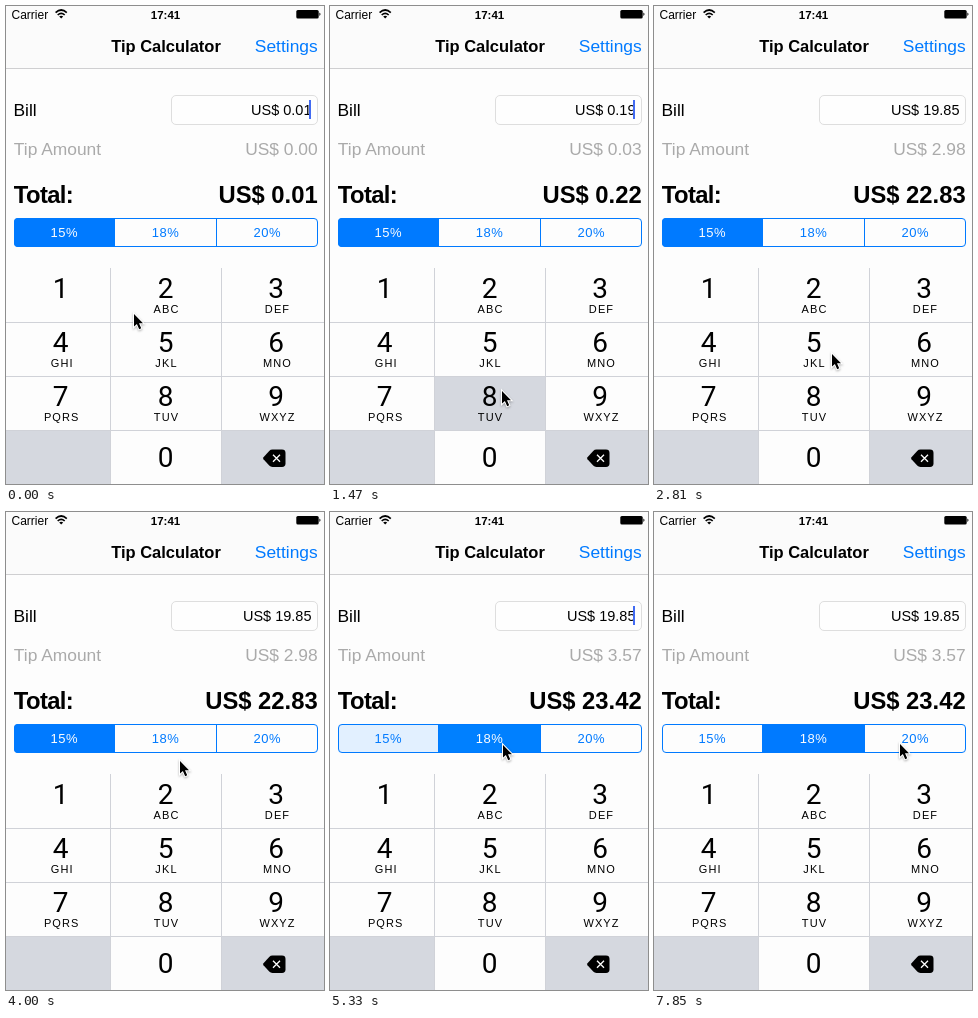
An HTML page that plays this animation: 318x478 px, repeating every 8000 ms.

```html
<!DOCTYPE html>
<html lang="en">
<head>
<meta charset="utf-8">
<title>Tip Calculator</title>
<style>
  html, body { margin: 0; width: 100%; height: 100%; overflow: hidden; background: #fdfdfd; }
  svg { display: block; width: 318px; height: 478px; font: 17.4px "Liberation Sans", Arial, sans-serif; }

  .bold { font-weight: bold; }
  .end, .sum { text-anchor: end; }
  .mid { text-anchor: middle; }
  .blue { fill: #007aff; }
  .gray { fill: #aaa; }
  .bill { font-size: 14.5px; }
  .total { font-size: 23.8px; font-weight: bold; }
  .rate { font-size: 13px; letter-spacing: .5px; }
  .digits { font-family: Roboto, "Liberation Sans", sans-serif; font-size: 28px; }
  .letters { font-size: 11px; letter-spacing: 1.1px; }
  .pad { fill: #d5d8df; }

  /* Every part holds its value until the next keyframe. */
  .sum, .press, .seg, .rate text, #caret, #cursor { animation: 8s step-end infinite; }
  .sum, .press { visibility: hidden; }

  #sum1 { animation-name: sum1; }
  #sum2 { animation-name: sum2; }
  #sum3 { animation-name: sum3; }
  #sum4 { animation-name: sum4; }
  #sum5 { animation-name: sum5; }
  @keyframes sum1 { 0% { visibility: visible } 7.375%, 100% { visibility: hidden } }
  @keyframes sum2 { 7.375% { visibility: visible } 18.5%, 100% { visibility: hidden } }
  @keyframes sum3 { 18.5% { visibility: visible } 27.75%, 100% { visibility: hidden } }
  @keyframes sum4 { 27.75% { visibility: visible } 66.625%, 100% { visibility: hidden } }
  @keyframes sum5 { 66.625%, 100% { visibility: visible } }

  #press8 { animation-name: press8; }
  #press5 { animation-name: press5; }
  @keyframes press8 { 16.625% { visibility: visible } 18.5%, 100% { visibility: hidden } }
  @keyframes press5 { 25.875% { visibility: visible } 27.75%, 100% { visibility: hidden } }

  #seg15 { animation-name: seg15; }
  #seg18 { animation-name: seg18; }
  #rate15 { animation-name: rate15; }
  #rate18 { animation-name: rate18; }
  @keyframes seg15 { 0% { fill: #007aff } 66.625% { fill: #e2f0ff } 68.5%, 100% { fill: #fdfdfd } }
  @keyframes seg18 {
    0% { fill: #fdfdfd } 64.875% { fill: #d9eaff }
    66.625% { fill: #0080ff } 68.5%, 100% { fill: #007aff }
  }
  @keyframes rate15 { 0% { fill: #fdfdfd } 66.625%, 100% { fill: #007aff } }
  @keyframes rate18 { 0% { fill: #007aff } 66.625%, 100% { fill: #fdfdfd } }

  #caret { animation-name: blink; }
  @keyframes blink {
    0%, 40.75%, 53.625%, 66.625%, 77.75%, 90.75% { opacity: 1 }
    33.375%, 38.875%, 44.5%, 51.75%, 59.25%, 64.875%, 70.375%, 83.25%, 88.875%, 96.25% { opacity: .5 }
    35.125%, 46.25%, 61.125%, 72.25%, 85.125%, 98.125%, 100% { opacity: 0 }
  }

  #cursor { animation-name: point; filter: drop-shadow(0 1px 1px rgba(0, 0, 0, .3)); }
  @keyframes point {
    0% { transform: translate(128px, 308px) }
    1.75% { transform: translate(146px, 325px) }
    3.625% { transform: translate(200px, 366px) }
    5.5% { transform: translate(240px, 391px) }
    7.375% { transform: translate(242px, 392px) }
    9.25% { transform: translate(222px, 386px) }
    11.125% { transform: translate(187px, 379px) }
    13% { transform: translate(174px, 383px) }
    14.75% { transform: translate(172px, 385px) }
    20.375% { transform: translate(173px, 378px) }
    22.125% { transform: translate(175px, 358px) }
    24% { transform: translate(178px, 348px) }
    46.25% { transform: translate(177px, 332px) }
    48.125% { transform: translate(175px, 288px) }
    50% { transform: translate(174px, 249px) }
    51.75% { transform: translate(173px, 235px) }
    53.625% { transform: translate(173px, 233px) }
    85.125% { transform: translate(182px, 233px) }
    87% { transform: translate(204px, 233px) }
    88.875% { transform: translate(228px, 232px) }
    90.75% { transform: translate(241px, 232px) }
    92.625%, 100% { transform: translate(246px, 232px) }
  }
</style>
</head>
<body>
<svg viewBox="0 0 318 478">
  <defs>
    <clipPath id="bar"><rect x="8" y="212" width="304" height="29" rx="4"/></clipPath>
  </defs>
  <rect width="318" height="478" fill="#fdfdfd"/>

  <!-- Status and title bar -->
  <rect width="318" height="62" fill="#fbfbfb"/>
  <rect y="62" width="318" height="1" fill="#cfcfd1"/>
  <text x="5.5" y="12.5" font-size="12">Carrier</text>
  <g fill="none" stroke="#000" stroke-width="1.7">
    <path d="M49.6 6.6Q55.2 1.4 60.8 6.6M51.7 9Q55.2 5.7 58.7 9"/>
    <path d="M55.2 12.6L53.2 10.5Q55.2 8.9 57.2 10.5Z" fill="#000" stroke="none"/>
  </g>
  <text class="bold mid" x="159.5" y="12.5" font-size="11.5">17:41</text>
  <rect x="290.3" y="4" width="22.4" height="8.5" rx="1.5"/>
  <path d="M313.4 6.5Q315.6 8.2 313.4 10Z"/>
  <text class="bold mid" x="160" y="46" font-size="16.5">Tip Calculator</text>
  <text class="blue end" x="311.7" y="46">Settings</text>

  <!-- Amounts -->
  <rect x="165.5" y="89.5" width="146" height="29" rx="4.5" fill="#fefefe" stroke="#dedede"/>
  <text x="7.5" y="110">Bill</text>
  <text class="gray" x="7.8" y="149">Tip Amount</text>
  <text class="total" x="7.8" y="197" letter-spacing="-.6">Total:</text>
  <g id="sum1" class="sum">
    <text class="bill" x="305.5" y="109">US$ 0.01</text>
    <text class="gray" x="311.7" y="149">US$ 0.00</text>
    <text class="total" x="311.7" y="197">US$ 0.01</text>
  </g>
  <g id="sum2" class="sum">
    <text class="bill" x="305.5" y="109">US$ 0.19</text>
    <text class="gray" x="311.7" y="149">US$ 0.03</text>
    <text class="total" x="311.7" y="197">US$ 0.22</text>
  </g>
  <g id="sum3" class="sum">
    <text class="bill" x="305.5" y="109">US$ 1.98</text>
    <text class="gray" x="311.7" y="149">US$ 0.30</text>
    <text class="total" x="311.7" y="197">US$ 2.28</text>
  </g>
  <g id="sum4" class="sum">
    <text class="bill" x="305.5" y="109">US$ 19.85</text>
    <text class="gray" x="311.7" y="149">US$ 2.98</text>
    <text class="total" x="311.7" y="197">US$ 22.83</text>
  </g>
  <g id="sum5" class="sum">
    <text class="bill" x="305.5" y="109">US$ 19.85</text>
    <text class="gray" x="311.7" y="149">US$ 3.57</text>
    <text class="total" x="311.7" y="197">US$ 23.42</text>
  </g>
  <rect id="caret" x="303" y="94" width="2" height="19" fill="#426bf2"/>

  <!-- Tip rates -->
  <g clip-path="url(#bar)">
    <rect id="seg15" class="seg" x="8" y="212" width="100" height="29"/>
    <rect id="seg18" class="seg" x="109" y="212" width="101" height="29"/>
  </g>
  <rect x="8.5" y="212.5" width="303" height="28" rx="3.5" fill="none" stroke="#007aff"/>
  <path d="M108.5 212V241M210.5 212V241" stroke="#007aff"/>
  <g class="rate mid">
    <text id="rate15" x="58.2" y="231">15%</text>
    <text id="rate18" x="159.5" y="231">18%</text>
    <text class="blue" x="261.3" y="231">20%</text>
  </g>

  <!-- Keypad -->
  <path class="pad" d="M0 425H104V478H0ZM216 425H318V478H216Z"/>
  <rect id="press8" class="pad press" x="105" y="371" width="110" height="53"/>
  <rect id="press5" class="pad press" x="105" y="317" width="110" height="53"/>
  <path d="M104.5 262V478M215.5 262V478M0 316.5H318M0 370.5H318M0 424.5H318" stroke="#d0d2d8"/>
  <g class="digits mid">
    <text x="54.5 159.5 270" y="291.5">123</text>
    <text x="54.5 159.5 270" y="345.5">456</text>
    <text x="54.5 159.5 270" y="399.5">789</text>
    <text x="159.5" y="461">0</text>
  </g>
  <g class="letters mid">
    <text x="160.5" y="307">ABC</text>
    <text x="271.5" y="307">DEF</text>
    <text x="56.3" y="361">GHI</text>
    <text x="160.5" y="361">JKL</text>
    <text x="271.5" y="361">MNO</text>
    <text x="55.7" y="415">PQRS</text>
    <text x="160.5" y="415">TUV</text>
    <text x="271.5" y="415">WXYZ</text>
  </g>
  <path d="M257.5 451.2L263.2 445Q264.5 443.6 266.5 443.6H276Q279.5 443.6 279.5 447V457.5Q279.5 460.9 276 460.9H266.5Q264.5 460.9 263.2 459.5L257.5 453.3Q256.6 452.3 257.5 451.2Z"/>
  <path d="M267 448.8L274 455.8M274 448.8L267 455.8" stroke="#fdfdfd" stroke-width="1.3"/>

  <path id="cursor" d="M0 0V12.6L2.9 9.9L5.2 15.2L7.2 14.3L5 9.2H9Z" stroke="#fff" stroke-width="2" paint-order="stroke"/>
</svg>
</body>
</html>
```
